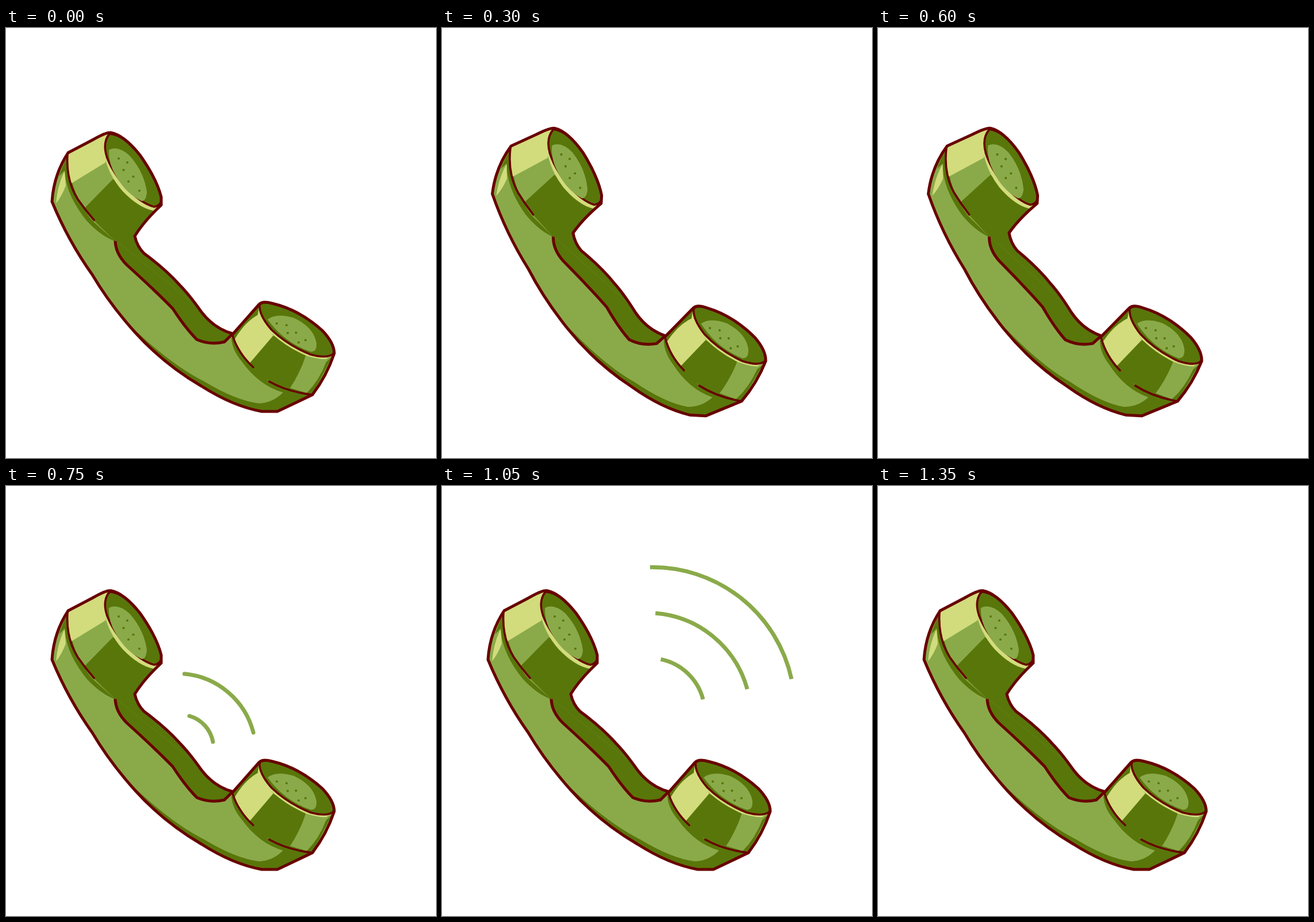
Write an HTML page that moves like this. It is 748 px wide and 748 px high and loops after 1.5 s.

```html
<!DOCTYPE html>
<html lang="en">
<head>
<meta charset="utf-8">
<title>Ringing phone</title>
<style>
  html, body { margin: 0; width: 100%; height: 100%; overflow: hidden; background: #fff; }
  svg { display: block; width: 100vw; height: 100vh; }
  .mid { fill: #8aaa4a; }
  .dark { fill: #59760a; }
  .light { fill: #d2dc7c; }
  .line { stroke: #680000; stroke-width: 5; stroke-linejoin: round; stroke-linecap: round; }
  .line:not(.dark) { fill: none; }
  .fine { stroke-width: 3.6; }
  #waves { fill: none; stroke: #8aaa4a; stroke-width: 7; }
</style>
</head>
<body>
<svg viewBox="0 0 748 748">
  <defs>
    <path id="body" d="M108 217L150 195Q174 181 182 182Q205 186 233 221Q262 262 270 294L270 308Q240 336 224 362Q228 380 240 392Q278 420 302 447Q318 463 340 494Q362 523 395 532L440 481Q446 474 463 479Q510 490 550 526Q571 548 571 566Q558 605 533 638L472 667L445 667Q395 658 340 623Q275 585 225 530Q180 480 150 429Q108 370 80 302Q83 255 108 217Z"/>
    <clipPath id="inside"><use href="#body"/></clipPath>
  </defs>
  <g id="phone">
    <g clip-path="url(#inside)">
      <use href="#body" class="mid"/>

      <!-- handle -->
      <path class="dark" d="M190 369L393 533L420 440L224 340Z"/>
      <path class="dark line" d="M190 369Q190 392 210 412Q265 462 290 488Q312 522 332 542Q355 552 380 546L393 533"/>
      <path class="dark" d="M533 638L472 690L380 660Q275 585 210 512Q285 585 345 615Q400 648 440 653Q464 652 482 634Q440 622 410 580Q393 560 392 538L432 590L458 615Z"/>
      <path class="dark" d="M107 222Q98 240 92 258L102 248Q104 290 140 335Q165 362 190 371L150 335Q112 290 107 222Z"/>
      <path class="light" d="M102 249Q90 272 87 305Q98 291 104 274Z"/>

      <!-- earpiece -->
      <path class="light" d="M108 217L178 183L173 234L114 270Q104 245 108 217Z"/>
      <path class="dark" d="M186 263L137 313L153 335L190 371L224 363L270 308Z"/>
      <path class="light" d="M172 226Q180 258 203 284Q232 314 258 318L268 309L200 240Z"/>
      <path class="dark line fine" d="M180 184Q167 200 176 226Q184 248 207 276Q236 306 258 311Q272 308 270 294Q262 262 233 221Q205 186 180 184Z"/>
      <path class="mid" d="M179 212Q195 204 215 222Q240 250 245 285Q244 301 236 301Q208 288 190 255Q178 235 179 212Z"/>

      <!-- mouthpiece -->
      <path class="light" d="M438 485L398 540Q402 560 424 583L465 535Z"/>
      <path class="dark" d="M440 481L393 533L398 541Q415 512 438 499Z"/>
      <path class="dark" d="M465 535L424 583Q438 602 460 615L493 628Q512 600 522 568Z"/>
      <path class="dark" d="M567 572L533 638L523 635Q545 613 557 581Z"/>
      <path class="light" d="M440 490Q450 516 466 535Q490 556 522 570Q545 577 557 576L569 568L500 530Z"/>
      <path class="dark line fine" d="M441 482Q446 475 465 479Q510 490 550 526Q573 548 570 566Q560 576 530 568Q490 552 462 525Q440 500 441 482Z"/>
      <path class="mid" d="M455 507Q470 495 500 504Q535 520 540 548Q541 564 530 563Q485 548 455 507Z"/>

      <g id="holes" class="dark"></g>
    </g>
    <use href="#body" class="line"/>
    <path class="line fine" d="M107 220Q104 265 125 298Q138 317 153 334M394 535Q404 566 430 590M458 615Q490 633 533 638"/>
  </g>
  <path id="waves"/>
</svg>
<script>
  const get = id => document.getElementById(id);
  const frameTime = 150, frames = 10, ringFrames = 5, tilt = 3.2;
  const gaps = [0.95, 1.14, 1.04, 1.36]; // wave spacing at each step

  // a row of three holes from (x, y)
  const holeRow = (x, y, dx, dy) => [0, 1, 2].map(n =>
    `<circle cx="${x + n * dx}" cy="${y + n * dy}" r="2.1"/>`).join('');
  get('holes').innerHTML =
    holeRow(196, 227, 8.5, 20) + holeRow(211, 234, 10.5, 24.5) +
    holeRow(471, 514, 19, 16.5) + holeRow(488, 517, 16.5, 13);

  // waves drift up and right, speeding up; n counts outwards
  function wave(step, n) {
    const drift = step + 0.03 * step ** 3, out = n * gaps[step];
    const x = 319 + 27.5 * drift - 9 * out, y = 400 - 44 * drift - 77 * out;
    const u = 360 + 42 * drift + 74 * out, v = 445 - 33 * drift - 17 * out;
    const r = Math.hypot(u - x, v - y) * (0.95 - 0.08 * n);
    return `M${x} ${y}A${r} ${r} 0 0 1 ${u} ${v}`;
  }

  function draw(now) {
    const i = Math.floor(now / frameTime) % frames;
    const step = i - ringFrames;
    const angle = i > 0 && step < 0 ? tilt * (-1) ** i : 0;
    const count = step >= 0 && step < gaps.length ? Math.min(3, step + 2) : 0;
    get('phone').setAttribute('transform', `rotate(${-angle * -1} 325 430)`);
    get('waves').setAttribute('d', [0, 1, 2].slice(0, count).map(n => wave(step, n)).join(''));
    get('waves').setAttribute('stroke-linecap', step ? 'butt' : 'round');
    requestAnimationFrame(draw);
  }
  draw(performance.now());
</script>
</body>
</html>
```
